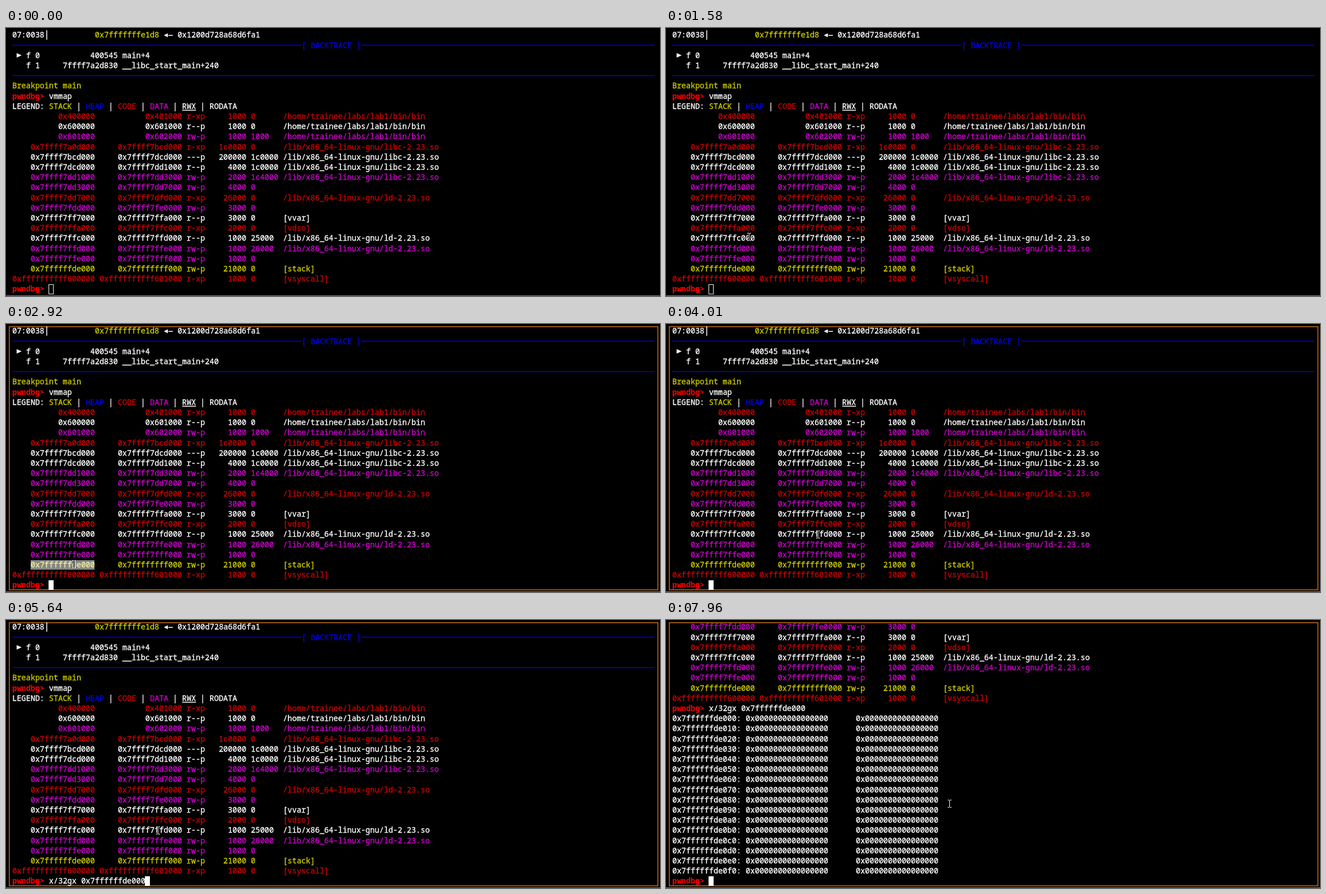
Animation of 1168 by 480 pixels, one loop 8 s. Source, as an HTML page with a canvas:

```html
<!DOCTYPE html>
<html lang="en">
<head>
<meta charset="utf-8">
<title>Debugger session</title>
<style>
html, body { margin: 0; width: 100%; height: 100%; overflow: hidden; background: #000; }
canvas { display: block; width: 1168px; height: 480px; }
</style>
</head>
<body>
<canvas id="stage" width="1168" height="480"></canvas>
<script>
const ctx = document.getElementById('stage').getContext('2d', { alpha: false });
const LOOP = 8000, CELL = 8.2, LINE = 18.2, LEFT = 11.2, TOP = 4.4, STROKE = 1.5;
const FONT = '13.667px "Noto Sans Mono", "DejaVu Sans Mono", monospace';
const WHITE = '#fff', RED = '#cd0000', YELLOW = '#cdcd00', BLUE = '#0000ee', MAGENTA = '#cd00cd';
const BRIGHT_RED = '#ff0000', ORANGE = '#c87014';

const FOCUS = 2830, SELECT = 2920, DESELECT = 4010, PASTE = 5640, RUN = 6420;
const STACK = '0x7ffffffde000', COMMAND = 'x/32gx ' + STACK;
const KEY_TIMES = [4090, 4480, 4550, 4630, 4860, 5010, 5240];

const BIN = '/home/trainee/labs/lab1/bin/bin';
const LIBC = '/lib/x86_64-linux-gnu/libc-2.23.so';
const LD = '/lib/x86_64-linux-gnu/ld-2.23.so';
const MAPS = [
  [RED, '0x400000', '0x401000', 'r-xp', '1000', '0', BIN],
  [WHITE, '0x600000', '0x601000', 'r--p', '1000', '0', BIN],
  [MAGENTA, '0x601000', '0x602000', 'rw-p', '1000', '1000', BIN],
  [RED, '0x7ffff7a0d000', '0x7ffff7bcd000', 'r-xp', '1c0000', '0', LIBC],
  [WHITE, '0x7ffff7bcd000', '0x7ffff7dcd000', '---p', '200000', '1c0000', LIBC],
  [WHITE, '0x7ffff7dcd000', '0x7ffff7dd1000', 'r--p', '4000', '1c0000', LIBC],
  [MAGENTA, '0x7ffff7dd1000', '0x7ffff7dd3000', 'rw-p', '2000', '1c4000', LIBC],
  [MAGENTA, '0x7ffff7dd3000', '0x7ffff7dd7000', 'rw-p', '4000', '0', ''],
  [RED, '0x7ffff7dd7000', '0x7ffff7dfd000', 'r-xp', '26000', '0', LD],
  [MAGENTA, '0x7ffff7fdd000', '0x7ffff7fe0000', 'rw-p', '3000', '0', ''],
  [WHITE, '0x7ffff7ff7000', '0x7ffff7ffa000', 'r--p', '3000', '0', '[vvar]'],
  [RED, '0x7ffff7ffa000', '0x7ffff7ffc000', 'r-xp', '2000', '0', '[vdso]'],
  [WHITE, '0x7ffff7ffc000', '0x7ffff7ffd000', 'r--p', '1000', '25000', LD],
  [MAGENTA, '0x7ffff7ffd000', '0x7ffff7ffe000', 'rw-p', '1000', '26000', LD],
  [MAGENTA, '0x7ffff7ffe000', '0x7ffff7fff000', 'rw-p', '1000', '0', ''],
  [YELLOW, STACK, '0x7ffffffff000', 'rw-p', '21000', '0', '[stack]'],
  [RED, '0xffffffffff600000', '0xffffffffff601000', 'r-xp', '1000', '0', '[vsyscall]'],
];

// Pointer moves: start, end, number of steps, path
const MOVES = [
  [280, 430, 3, [[773, 190], [412, 216]]],
  [660, 810, 3, [[412, 216], [211, 358]]],
  [1120, 1580, 7, [[211, 358], [172, 392], [148, 374]]],
  [2210, 2280, 2, [[148, 374], [136, 425]]],
  [2510, 2670, 3, [[136, 425], [121, 430]]],
  [3690, 3840, 3, [[121, 430], [271, 377]]],
  [7200, 7960, 11, [[271, 377], [160, 188], [190, 402], [506, 329]]],
];

const colX = col => LEFT + col * CELL;
const rowY = row => TOP + row * LINE;

function rect(x, y, w, h, color) {
  ctx.fillStyle = color;
  ctx.fillRect(x, y, w, h);
}

function text(str, col, row, color = WHITE, bold = false) {
  const x = colX(col), y = Math.round(rowY(row) + 13);
  ctx.font = (bold ? 'bold ' : '') + FONT;
  ctx.fillStyle = color;
  ctx.fillText(str, x, y);
  if (bold) return;
  // A hairline outline gives the slightly heavier terminal weight
  ctx.strokeStyle = color;
  ctx.lineWidth = .35;
  ctx.strokeText(str, x, y);
}

function triangle(tipX, baseX, y, half) {
  ctx.fillStyle = WHITE;
  ctx.beginPath();
  ctx.moveTo(tipX, y);
  ctx.lineTo(baseX, y - half);
  ctx.lineTo(baseX, y + half);
  ctx.fill();
}

function rule(row, from, to) {
  rect(from, rowY(row) + 7.4, to - from, STROKE, BLUE);
}

function prompt(row, typed = '') {
  text('pwndbg>', 0, row, BRIGHT_RED, true);
  text(typed, 8, row);
}

function mapRow(index, row) {
  const [color, start, end, perm, size, offset, path] = MAPS[index];
  const line = [start.padStart(18), end.padStart(18), perm, size.padStart(8), offset.padEnd(6), path];
  text(line.join(' '), 0, row, color);
}

function header() {
  text('07:0038', 0, 0);
  rect(72, 4, STROKE, 17, WHITE);
  text('0x7fffffffe1d8', 18, 0, YELLOW);
  triangle(282, 289, 13, 3.5);
  rect(290, 12.5, 8, STROKE, WHITE);
  text('0x1200d728a68d6fa1', 36, 0);

  rule(1, LEFT, colX(63));
  text('[ BACKTRACE ]', 63, 1, BLUE);
  rule(1, colX(76), 1158);
  triangle(28, 19, 49, 4);
  text('f 0' + '400545'.padStart(17) + ' main+4', 3, 2);
  text('f 1' + '7ffff7a2d830'.padStart(17) + ' __libc_start_main+240', 3, 3);
  rule(4, LEFT, 1158);

  text('Breakpoint main', 0, 5, YELLOW);
  prompt(6, 'vmmap');
  text('LEGEND:       |      |      |      |     | RODATA', 0, 7);
  text('STACK', 8, 7, YELLOW);
  text('HEAP', 16, 7, BLUE);
  text('CODE', 23, 7, RED);
  text('DATA', 30, 7, MAGENTA);
  text('RWX', 37, 7);
  rect(colX(37), 146.6, 3 * CELL, STROKE, WHITE);
}

function cursor(col, focused) {
  const x = Math.floor(colX(col)), w = Math.floor(colX(col + 1)) - x;
  if (focused) return rect(x, 459, w, 17, WHITE);
  ctx.strokeStyle = WHITE;
  ctx.lineWidth = 1;
  ctx.strokeRect(x + .5, 459.5, w - 1, 17);
}

function typedAt(t) {
  if (t >= PASTE) return COMMAND;
  return COMMAND.slice(0, KEY_TIMES.filter(time => t >= time).length);
}

function mapScreen(t) {
  header();
  MAPS.forEach((_, i) => mapRow(i, i + 8));
  if (t >= SELECT && t < DESELECT) {
    rect(44, 423, 114, 17, '#868686');
    text(STACK, 4, 23, '#f0f0a0');
  }
  const typed = typedAt(t);
  prompt(25, typed);
  cursor(8 + typed.length, t >= FOCUS);
}

function dumpScreen() {
  for (let i = 9; i < MAPS.length; i++) mapRow(i, i - 9);
  prompt(8, COMMAND);
  const zero = '0x' + '0'.repeat(16);
  for (let i = 0; i < 16; i++) {
    text(`0x7ffffffde0${i.toString(16)}0: ${zero}      ${zero}`, 0, 9 + i);
  }
  prompt(25);
  cursor(8, true);
}

function along(path, p) {
  const place = p * (path.length - 1);
  const i = Math.min(Math.floor(place), path.length - 2);
  const f = place - i;
  return path[i].map((v, axis) => Math.round(v + (path[i + 1][axis] - v) * f));
}

function pointerAt(t) {
  const move = MOVES.filter(m => t >= m[0]).pop();
  if (!move) return null;
  const [start, end, steps, path] = move;
  const step = Math.min(steps - 1, Math.floor((t - start) / (end - start) * (steps - 1) + 1e-6));
  // The first move begins with the pointer coming into view
  const p = start === MOVES[0][0] ? step / (steps - 1) : (step + 1) / steps;
  return along(path, p);
}

function pointer([x, y]) {
  const parts = [[x - 3, y - 7, 3, 1], [x + 1, y - 7, 3, 1], [x, y - 6, 1, 12], [x - 3, y + 6, 3, 1], [x + 1, y + 6, 3, 1]];
  for (const [px, py, w, h] of parts) rect(px - 1, py, w + 2, h, '#000');
  for (const part of parts) rect(...part, WHITE);
}

function draw(t) {
  rect(0, 0, 1168, 480, '#000');
  if (t >= FOCUS) {
    ctx.strokeStyle = ORANGE;
    ctx.lineWidth = STROKE;
    ctx.strokeRect(5.9, 4.8, 1158.4, 471.4);
  }
  if (t < RUN) mapScreen(t);
  else dumpScreen();
  rect(0, 479, 1168, 1, '#888684');
  const place = pointerAt(t);
  if (place) pointer(place);
}

const origin = performance.now();
function tick() {
  draw((performance.now() - origin) % LOOP);
  requestAnimationFrame(tick);
}
tick();
</script>
</body>
</html>
```
